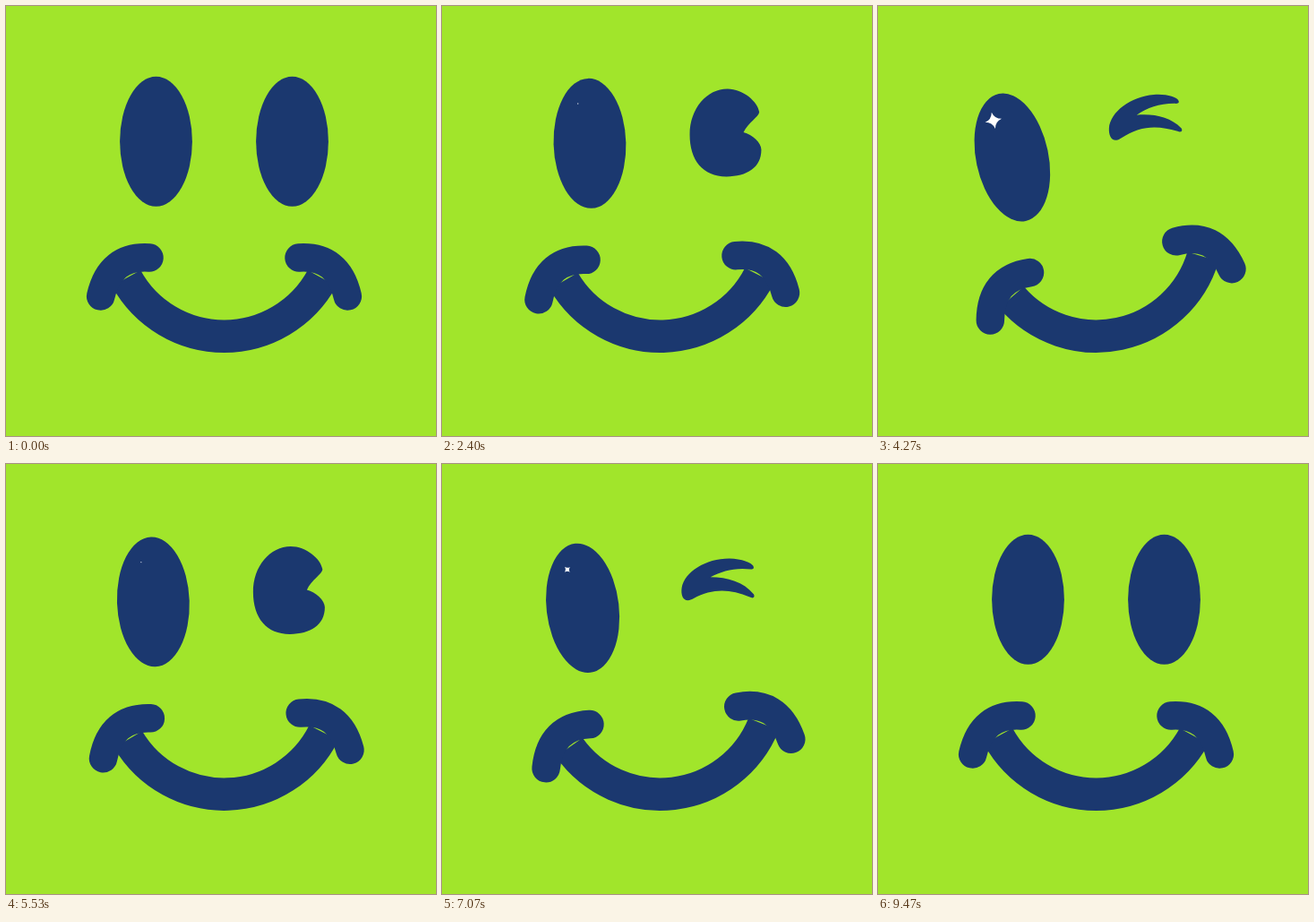
An HTML page that plays this animation: 480x480 px, repeating every 9.94 s.

```html
<!DOCTYPE html>
<html>
<head>
<meta charset="utf-8">
<style>
  html, body { margin: 0; height: 100%; overflow: hidden; background: #a1e52b; }
  svg { display: block; width: 100vw; height: 100vh; }
</style>
</head>
<body>
<svg viewBox="0 0 480 480" fill="#1b386f">
  <g id="face">
    <ellipse cx="167.5" cy="151.2" rx="40.4" ry="72.5"/>
    <ellipse class="eye" cx="319.5" cy="151.2" rx="40.4" ry="72.5"/>
    <path class="eye" transform="rotate(1.9 243.5 244)" d="M336 140.500C341 130 353 123 353.500 118C352 106 335 92 318 92C295 92 276 114 276 143C276 172 291 190 317 190C340 190 356 180 356 160C356 152 346 143 336 140.500Z"/>
    <path class="eye" transform="rotate(7.1 243.5 244)" d="M274 152C268 152 266 145 267 138C270 120 294 105 320 105C334 105 345 110 346.500 113C348 116 347 117 344 117C326 115 312 119 299 126C318 126 336 131 347.500 145C349 148 347 150 343 148C321 139 302 138 280 150C278 151 276 152 274 152Z"/>
    <g fill="none" stroke="#1b386f">
      <path stroke-width="36.5" d="M134.200 303.800A124.500 124.500 0 0 0 352.800 303.800"/>
      <g stroke-width="31.5" stroke-linecap="round">
        <path id="cheek" d="M105.700 324Q116 278 160 281"/>
        <use href="#cheek" transform="matrix(-1 0 0 1 487 0)"/>
      </g>
    </g>
    <path id="spark" fill="#fff" d="M0-1Q.18-.18 1 0Q.18.18 0 1Q-.18.18-1 0Q-.18-.18 0-1Z"/>
  </g>
</svg>
<script>
  const LOOP = 9940, TILT = 12, RISE = 140, FALL = 200;
  // start and length of each wink, ms
  const winks = [[1040, 472], [2369, 640], [4040, 640], [5495, 640], [6995, 640], [8500, 640]];
  const face = document.getElementById('face');
  const spark = document.getElementById('spark');
  const eyes = document.querySelectorAll('.eye');

  const smooth = x => {
    x = Math.min(1, Math.max(0, x));
    return x * x * (3 - 2 * x);
  };

  function draw(now) {
    const t = now % LOOP;
    const [start, length] = winks.find(([s, d]) => t < s + d) || [LOOP, 0];
    const age = t - start;
    const k = smooth(age / RISE) * smooth((length - age) / FALL);
    const angle = TILT * k;
    const shape = angle < 1 ? 0 : angle < 5.4 ? 1 : 2;

    face.setAttribute('transform', `rotate(${-angle} 243.5 244)`);
    eyes.forEach((eye, i) => eye.style.display = i === shape ? '' : 'none');
    spark.style.display = shape ? '' : 'none';
    const size = Math.max(0.9, 12 * k - 2.6);
    spark.setAttribute('transform',
      `translate(155.5 106.5) rotate(${34 + 0.24 * age}) scale(${size})`);
    requestAnimationFrame(draw);
  }
  requestAnimationFrame(draw);
</script>
</body>
</html>
```
